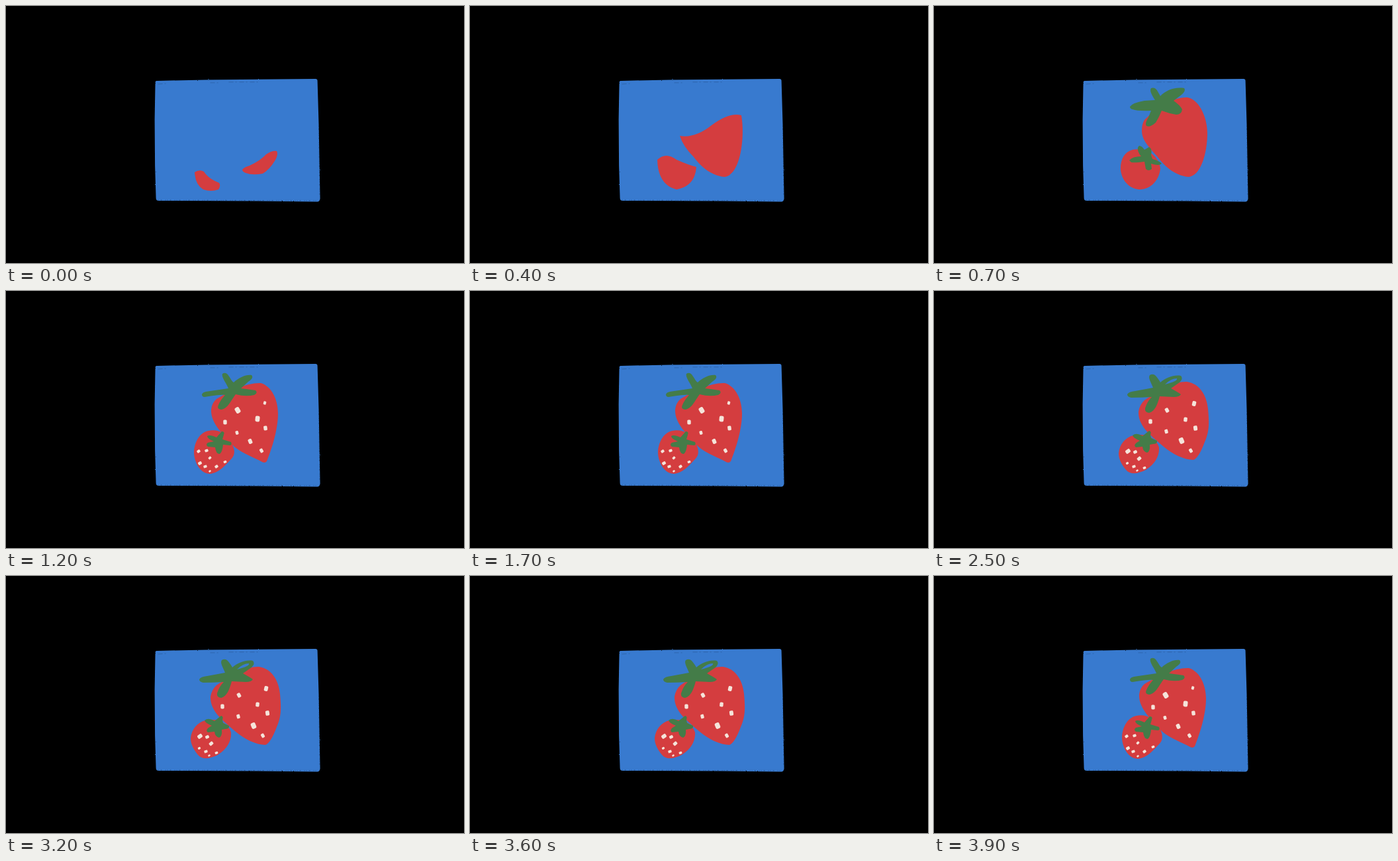
An HTML page that plays this animation: 692x388 px, repeating every 4 s.

```html
<!DOCTYPE html>
<html lang="en">
<head>
<meta charset="utf-8">
<title>Strawberries</title>
<style>
html, body { margin: 0; width: 100%; height: 100%; overflow: hidden; background: #000; }
svg { display: block; width: 100%; height: 100%; }
.red { fill: #d43d3f; }
.green { fill: #447c48; fill-rule: evenodd; }
.seed { fill: #f5e4da; }
.pose { visibility: hidden; }
</style>
</head>
<body>
<svg id="stage" viewBox="0 0 692 388">
  <filter id="rough" x="-5%" y="-5%" width="110%" height="110%" color-interpolation-filters="sRGB">
    <feTurbulence type="fractalNoise" baseFrequency=".45" numOctaves="2" seed="4"/>
    <feDisplacementMap in="SourceGraphic" scale="1.8" xChannelSelector="R" yChannelSelector="G"/>
  </filter>
  <g filter="url(#rough)" transform="translate(.6 .9)">
    <path fill="#387acf" d="M225 114 Q225 112 228 112 L300 110.5 L467 109 Q470 109 470 112 L472 180 L474 290 Q473 295 469 294.5 L380 293.5 L230 293 Q226 293 226 289 L224.5 240 L224 170Z"/>
    <path fill="none" stroke="#16365f" stroke-width=".6" stroke-dasharray="7 3 2 4" opacity=".5" d="M229 117 L244 116 M308 115 L322 115 M336 114 L383 114"/>
    <path fill="none" stroke="#0a1a30" stroke-width=".8" stroke-dasharray="1 3 2 5 1 2" opacity=".5" d="M229 292 L468 293 M472 180 L473.5 288"/>
  </g>
</svg>
<script>
const stage = document.getElementById('stage');

function add(parent, tag, attrs) {
  const node = document.createElementNS('http://www.w3.org/2000/svg', tag);
  for (const key in attrs) node.setAttribute(key, attrs[key]);
  return parent.appendChild(node);
}

// Seeds are triples: x, y, size
function makePose({ red, green = '', seeds = [] }) {
  const pose = add(stage, 'g', { class: 'pose' });
  add(pose, 'path', { class: 'red', d: red });
  add(pose, 'path', { class: 'green', d: green });
  for (let i = 0; i < seeds.length; i += 3) {
    const [x, y, size] = seeds.slice(i, i + 3), w = size * .9, h = size * 1.15;
    const small = y > 238 && x < 335;
    add(pose, 'rect', {
      class: 'seed', x: x - w / 2, y: y - h / 2, width: w, height: h, rx: size * .28,
      transform: `rotate(${small ? 50 + i * 4 % 30 : i * 31 % 50 - 30} ${x} ${y})`
    });
  }
  return pose;
}

const plumpRed = `M318 172 C335 155 360 137 383 138 C402 142 413 170 413 192 C413 220 404 257 384 258
  C365 256 350 244 338 228 C325 213 314 203 314 188 Q314 178 318 172Z
  M300 217 C320 213 340 226 342 245 C341 260 330 276 312 277 C296 277 284 264 282 248 C281 232 288 220 300 217Z`;

const daub = makePose({
  red: `M285 251 Q292 246 299 250 Q306 261 322 267 Q325 271 321 277 Q310 281 298 277 Q286 270 285 251Z
    M357 247 Q360 243 368 241 Q385 233 393 224 Q402 218 409 219 Q412 224 406 234 Q398 247 388 253 Q372 256 362 252 Q357 250 357 247Z`
});

const half = makePose({
  red: `M284 240 Q292 232 302 240 Q320 252 340 255 Q335 274 312 278 Q286 274 284 240Z
    M334 224 Q352 222 372 208 Q396 190 413 188 Q414 222 402 242 Q394 258 382 257 Q350 246 334 224Z`
});

const most = makePose({
  red: `M283 232 Q296 220 312 232 Q330 240 342 243 Q340 272 312 277 Q284 270 283 232Z
    M317 196 Q340 200 365 180 Q392 160 410 165 C416 200 408 257 384 258 C365 256 350 244 338 228 Q322 212 317 196Z`
});

const bare = makePose({ red: plumpRed });

const leafy = makePose({
  red: plumpRed,
  green: `M296 152 Q300 146 318 143 L334 142 C330 136 325 128 328 124 Q334 122 338 129 L342 136
    C350 128 362 122 378 124 Q381 128 374 134 L362 143 Q372 150 375 156 Q374 164 366 164 Q354 162 344 158
    Q340 168 335 176 Q326 184 321 181 Q318 178 324 168 L328 158 Q308 159 300 156 Q296 155 296 152Z
    M295 233 Q300 227 313 227 C308 221 306 214 310 211 Q314 211 318 217 L325 213 Q330 215 328 225 L330 231
    Q341 234 344 238 Q340 242 328 238 L329 246 Q324 250 320 246 L318 235 Q304 237 298 236Z`
});

const slim = makePose({
  red: `M318 163 C340 150 365 138 385 139 C402 144 411 165 411 185 C411 210 401 240 394 257 Q391 261 385 257
    C372 250 352 243 342 232 C328 216 309 200 310 179 Q311 169 318 163Z
    M306 211 C320 208 334 215 340 228 C347 240 346 248 340 254 C332 262 322 275 308 276 C294 276 284 259 284 243 C285 226 294 213 306 211Z`,
  green: `M296 156 Q297 153 302 152 L336 147 C333 139 325 130 327 125 Q331 122 335 126 C340 133 341 136 344 138
    C352 131 362 126 371 127 Q375 131 366 137 L355 147 Q371 149 377 150 Q381 154 375 157 Q362 160 347 156
    C340 165 335 178 325 179 Q318 178 321 172 C324 165 327 162 331 157 C320 156 310 159 300 160 Q296 160 296 156Z
    M304 219 Q308 216 318 221 L326 212 Q331 212 329 217 L327 224 L340 228 Q342 233 338 233 L328 232
    Q327 243 323 246 Q317 246 316 236 L305 235 Q301 232 305 229 L314 227 Q304 223 304 219Z`,
  seeds: [
    350, 180, 8, 391, 169, 4.5, 380, 193, 7.5, 331, 198, 6, 392, 207, 6, 349, 214, 5, 369, 227, 6.5, 386, 241, 5.5,
    291, 242, 4.5, 303, 241, 4.5, 308, 252, 4, 293, 260, 5, 301, 265, 4.5, 318, 265, 4.5, 331, 258, 4, 308, 272, 3
  ]
});

const wide = makePose({
  red: `M318 165 C340 150 365 136 382 137 C402 140 412 158 414 178 C416 200 416 212 409 228 Q400 252 392 255
    C378 255 360 246 347 235 C330 220 308 205 309 182 Q311 171 318 165Z
    M301 218 C320 214 336 222 340 236 C341 250 333 262 320 270 C308 276 297 278 290 270 C283 262 279 253 279 245 C280 232 289 221 301 218Z`,
  green: `M292 156 Q294 152 304 151 L331 146 C328 138 323 131 326 127 Q331 124 335 128 Q340 134 342 138
    C350 131 363 126 373 128 Q377 132 371 138 L358 147 Q369 153 373 156 Q371 160 362 160 L341 159
    C338 170 334 182 325 184 Q318 183 319 177 Q322 167 329 160 Q312 161 298 161 Q292 160 292 156Z
    M349 141 Q358 132 367 132 Q369 136 349 141Z
    M300 218 Q306 213 315 219 L325 211 Q329 212 327 217 L328 222 L337 226 Q338 231 331 231 L326 232
    Q327 242 322 244 Q316 243 315 235 L305 236 Q301 233 306 229 L311 226 Q301 222 300 218Z`,
  seeds: [
    352, 180, 6, 393, 170, 6.5, 380, 194, 6, 327, 197, 6, 395, 207, 6.5, 351, 212, 5.5, 374, 226, 8, 388, 241, 5.5,
    293, 242, 6.5, 304, 243, 5, 310, 253, 5.5, 292, 260, 3.5, 302, 265, 4.5, 307, 271, 3, 318, 267, 4
  ]
});

const build = [[1100, slim], [900, wide], [700, leafy], [500, bare], [300, most], [100, half], [0, daub]];
const wobbleStart = 1220, wobbleStep = 215;

function poseAt(t) {
  if (t < wobbleStart) return build.find(([start]) => t >= start)[1];
  return Math.floor((t - wobbleStart) / wobbleStep) % 2 ? wide : slim;
}

let shown;
function draw() {
  // The picture only changes every 100 ms
  const t = Math.floor(performance.now() % 4000 / 100) * 100;
  const pose = poseAt(t);
  if (pose !== shown) {
    if (shown) shown.style.visibility = 'hidden';
    pose.style.visibility = 'visible';
    shown = pose;
  }
  requestAnimationFrame(draw);
}
draw();
</script>
</body>
</html>
```
